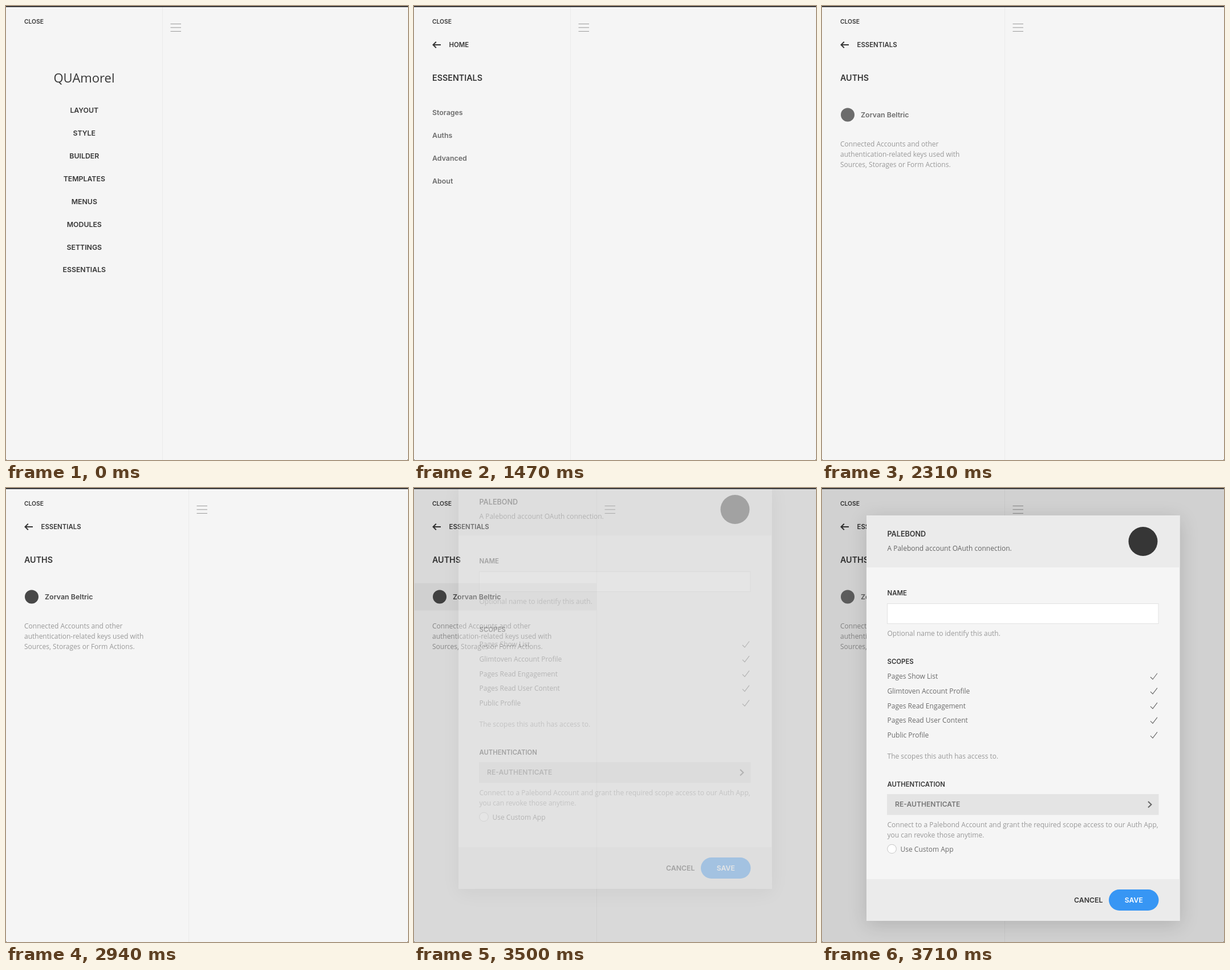
An HTML page with a canvas for the animation above (5.74 s loop, 705 by 795 pixels).

```html
<!DOCTYPE html>
<html lang="en">
<head>
<meta charset="utf-8">
<title>Sidebar panels</title>
<style>
html, body { margin: 0; width: 100%; height: 100%; overflow: hidden; background: #f5f5f5; }
canvas { display: block; }
</style>
</head>
<body>
<canvas id="stage" width="705" height="795"></canvas>
<script>
const W = 705, H = 795, LOOP = 5740, TICK = 70;
const DARK = 54, MID = 108, HOVER = '#e3e3e3';
const HEAD = 'Inter, sans-serif', BODY = '"Open Sans", sans-serif';
const stage = document.getElementById('stage').getContext('2d');

const gray = v => `rgb(${v},${v},${v})`;
const mix = (a, b, k) => Math.round(a + (b - a) * k);
const ramp = (t, start, length) => Math.min(1, Math.max(0, (t - start) / length));

// cubic-bezier(.25, .1, .25, 1)
function ease(x) {
  if (x <= 0 || x >= 1) return Math.min(1, Math.max(0, x));
  const curve = (a, b, s) => 3 * a * s * (1 - s) ** 2 + 3 * b * s * s * (1 - s) + s ** 3;
  let lo = 0, hi = 1;
  for (let i = 0; i < 30; i++) {
    const s = (lo + hi) / 2;
    if (curve(.25, .25, s) < x) lo = s; else hi = s;
  }
  return curve(.1, 1, lo);
}

// y is the middle of the capital letters
function write(c, str, x, y, size, color, font, weight, align = 'left') {
  c.font = `${weight} ${size}px ${font}`;
  c.textAlign = align;
  c.fillStyle = color;
  c.fillText(str, x, y + size * .36);
}
const head = (c, str, x, y, size, color = gray(DARK), align) =>
  write(c, str, x, y, size, color, HEAD, 600, align);
const body = (c, str, x, y, color) => write(c, str, x, y, 12, color, BODY, 400);

function box(c, x, y, w, h, color) {
  c.fillStyle = color;
  c.fillRect(x, y, w, h);
}

function line(c, points, color, width) {
  c.beginPath();
  points.forEach(([x, y]) => c.lineTo(x, y));
  c.strokeStyle = color;
  c.lineWidth = width;
  c.stroke();
}

function disc(c, x, y, r, color) {
  c.beginPath();
  c.arc(x, y, r, 0, 7);
  c.fillStyle = color;
  c.fill();
}

function makeDialog() {
  const canvas = document.createElement('canvas');
  canvas.width = W;
  canvas.height = H;
  const c = canvas.getContext('2d');
  c.shadowColor = 'rgba(0,0,0,.15)';
  c.shadowBlur = 32;
  c.shadowOffsetY = 7;
  box(c, 78, 48, 549.5, 710, '#f5f5f5');
  c.shadowColor = 'transparent';
  box(c, 78, 48, 549.5, 91, '#ebebeb');
  box(c, 78, 685, 549.5, 73, '#ebebeb');

  head(c, 'PALEBOND', 114.5, 80.5, 12.6);
  body(c, 'A Palebond account OAuth connection.', 114.5, 106, '#666');
  disc(c, 563, 93.5, 25.5, gray(DARK));

  head(c, 'NAME', 114.5, 184, 11.4);
  box(c, 114, 202, 476.5, 36, '#e2e2e2');
  box(c, 115, 203, 474.5, 34, '#fff');
  body(c, 'Optional name to identify this auth.', 114.5, 255, '#999');

  head(c, 'SCOPES', 114.5, 303.5, 11.4);
  ['Pages Show List', 'Glimtoven Account Profile', 'Pages Read Engagement',
    'Pages Read User Content', 'Public Profile'].forEach((scope, i) => {
    const y = 330 + i * 25.7;
    body(c, scope, 114.5, y, '#6c6c6c');
    line(c, [[576, y + 1], [580, y + 5], [588, y - 5.5]], '#666', 1.1);
  });
  body(c, 'The scopes this auth has access to.', 114.5, 469.5, '#999');

  head(c, 'AUTHENTICATION', 114.5, 518.5, 11.3);
  box(c, 114, 536, 476.5, 36.5, '#e4e4e4');
  head(c, 'RE-AUTHENTICATE', 128, 554, 12.1, '#777');
  line(c, [[572, 549], [577.5, 554.2], [572, 559.5]], '#666', 2);
  body(c, 'Connect to a Palebond Account and grant the required scope access to our Auth App,',
    114.5, 589.5, '#999');
  body(c, 'you can revoke those anytime.', 114.5, 607.5, '#999');
  disc(c, 122.5, 632, 8.3, '#c8c8c8');
  disc(c, 122.5, 632, 7.3, '#fff');
  body(c, 'Use Custom App', 137.5, 632.5, '#6c6c6c');

  head(c, 'CANCEL', 442, 721.5, 12.3);
  c.beginPath();
  c.roundRect(503, 703, 87.5, 37, 18.5);
  c.fillStyle = '#3796f4';
  c.fill();
  head(c, 'SAVE', 546.8, 721.5, 12.2, '#fff', 'center');
  return canvas;
}
const dialog = makeDialog();

function homePanel(c, t, w) {
  const hover = ramp(t, 490, 210);
  if (t >= 980) box(c, 0, 442, w, 40, HOVER);
  write(c, 'QUAmorel', 137, 126, 22, gray(DARK), BODY, 400, 'center');
  ['LAYOUT', 'STYLE', 'BUILDER', 'TEMPLATES', 'MENUS', 'MODULES', 'SETTINGS', 'ESSENTIALS']
    .forEach((item, i) => {
      const color = gray(i === 7 ? mix(DARK, 44, hover) : DARK);
      head(c, item, 137.3, 183 + i * 39.85, 12.3, color, 'center');
    });
}

function essentialsPanel(c, t, w) {
  const hover = ramp(t, 1610, 140);
  if (t >= 2030) box(c, 0, 206, w, 40, HOVER);
  head(c, 'ESSENTIALS', 32, 125.5, 14.3);
  ['Storages', 'Auths', 'Advanced', 'About'].forEach((item, i) => {
    const color = gray(i === 1 ? mix(MID, DARK, hover) : MID);
    head(c, item, 32, 186.5 + i * 39.85, 12.4, color);
  });
}

function authsPanel(c, t, w) {
  const hover = ramp(t, 2800, 210) - ramp(t, 3430, 210);
  const color = gray(mix(MID, DARK, hover));
  if (t >= 3430) {
    const press = 1 - ramp(t, 3430, 140);
    box(c, 0, 166.5, w, 48, `rgba(0,0,0,${.075 * press})`);
  }
  head(c, 'AUTHS', 32, 125.5, 14.3);
  disc(c, 45, 190.5, 12, color);
  head(c, 'Zorvan Beltric', 68, 190.5, 12.4, color);
  ['Connected Accounts and other', 'authentication-related keys used with',
    'Sources, Storages or Form Actions.'].forEach((text, i) =>
    body(c, text, 32, 242 + i * 18, '#999'));
}

function crumb(c, label, arrowAlpha, labelAlpha) {
  c.globalAlpha = arrowAlpha;
  line(c, [[47, 68], [33.5, 68]], gray(DARK), 2);
  line(c, [[38.8, 62.7], [33.5, 68], [38.8, 73.3]], gray(DARK), 2);
  c.globalAlpha = labelAlpha;
  head(c, label, 61.5, 68, 11.4);
  c.globalAlpha = 1;
}

function sidebar(c, t) {
  const first = ease(ramp(t, 928, 500)), second = ease(ramp(t, 1995, 310));
  const w = 274 + 46 * second;
  const position = first + second;

  box(c, w, 2, 1, H, '#ebebeb');
  for (const y of [31.4, 37.8, 44.4])
    line(c, [[w + 14.5, y], [w + 33, y]], '#999', 1);

  c.save();
  c.beginPath();
  c.rect(1, 2, w - 1, H);
  c.clip();
  [homePanel, essentialsPanel, authsPanel].forEach((panel, i) => {
    const offset = i - position;
    if (Math.abs(offset) >= 1) return;
    c.save();
    c.translate(offset * w, 0);
    panel(c, t, w);
    c.restore();
  });
  head(c, 'CLOSE', 32, 27, 10.3);
  if (second > 0) crumb(c, 'ESSENTIALS', 1, ease(ramp(t, 1995, 200)));
  else if (first > 0) {
    const alpha = ease(ramp(t, 928, 335));
    crumb(c, 'HOME', alpha, alpha);
  }
  c.restore();
}

function modal(c, t) {
  const fade = ramp(t, 3397, 137), drop = ramp(t, 3346, 350);
  if (!fade) return;
  box(c, 0, 2, W, H, `rgba(0,0,0,${.15 * fade})`);
  c.globalAlpha = fade * drop;
  c.drawImage(dialog, 0, Math.round(-100 * (1 - drop)));
  c.globalAlpha = 1;
}

function draw(now) {
  const t = Math.floor((now % LOOP) / TICK) * TICK;
  box(stage, 0, 0, W, H, '#f5f5f5');
  sidebar(stage, t);
  modal(stage, t);
  box(stage, 0, 0, W, 2, '#38383b');
  box(stage, 0, H - 1, 1, 1, '#555');
  box(stage, W - 1, H - 1, 1, 1, '#555');
}

const start = performance.now();
function frame() {
  draw(performance.now() - start);
  requestAnimationFrame(frame);
}
frame();
</script>
</body>
</html>
```
